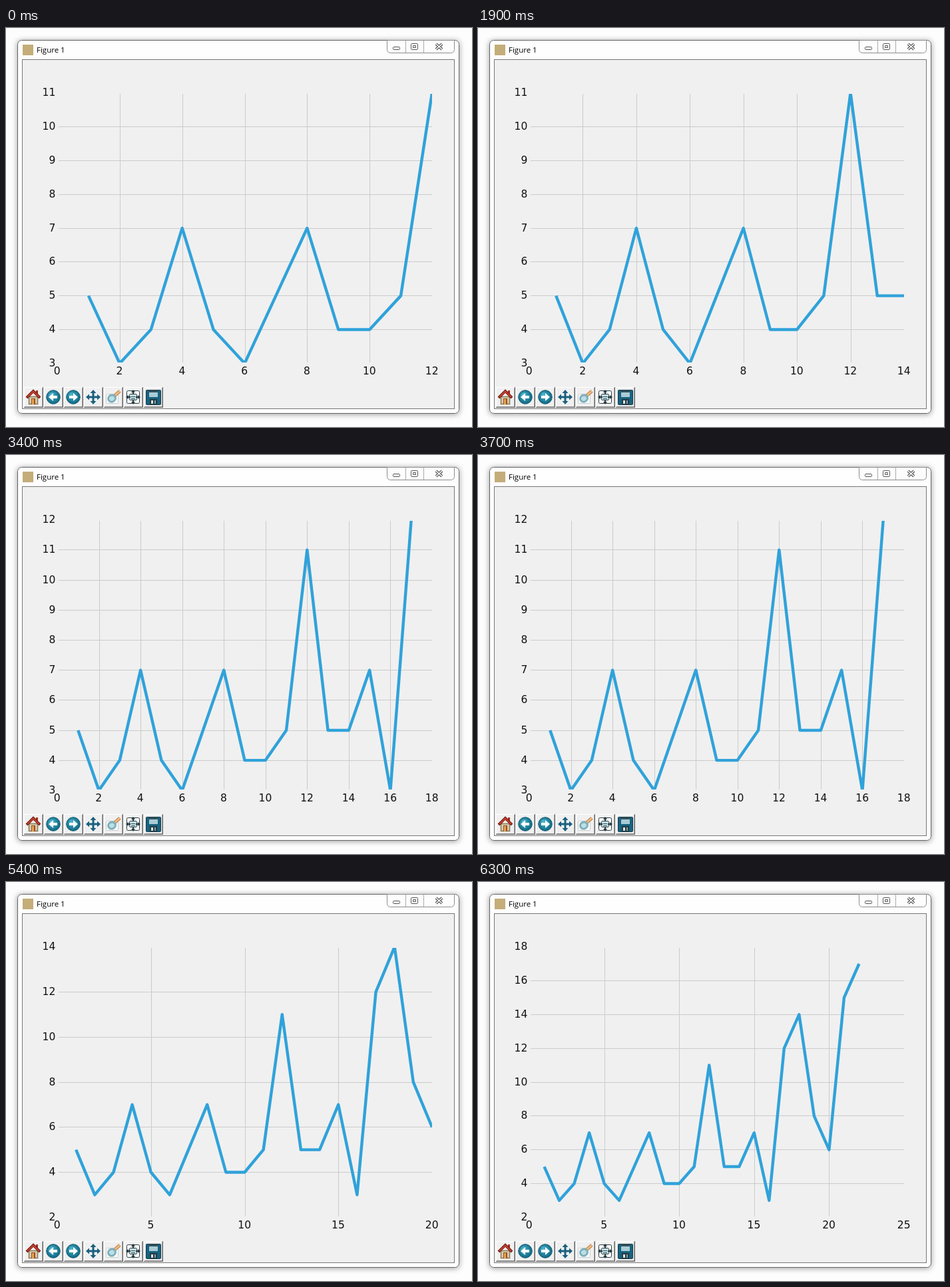
Recreate the animation shown at these times as an HTML page with a canvas. Size 700 px wide and 600 px high, loop 6.9 s.

```html
<!DOCTYPE html>
<html lang="en">
<head>
<meta charset="utf-8">
<title>Figure 1</title>
<style>
html, body { margin: 0; width: 100%; height: 100%; overflow: hidden; background: #fdfdfd; }
canvas { display: block; }
</style>
</head>
<body>
<canvas id="stage" width="700" height="600"></canvas>
<script>
const ctx = document.getElementById('stage').getContext('2d');
const LOOP = 6900;
const values = [5, 3, 4, 7, 4, 3, 5, 7, 4, 4, 5, 11, 5, 5, 7, 3, 12, 14, 8, 6, 15, 17];
const arrivals = [1200, 1700, 2200, 2700, 3300, 4000, 4400, 4900, 5500, 6000];
const firstCount = values.length - arrivals.length;
const plot = { left: 77, right: 640, top: 97.3, bottom: 504 };

function rect(x, y, w, h, color) {
  ctx.fillStyle = color;
  ctx.fillRect(x, y, w, h);
}

function path(points, { fill, stroke, width = 1, close = false } = {}) {
  ctx.beginPath();
  points.forEach(([x, y]) => ctx.lineTo(x, y));
  if (close) ctx.closePath();
  if (fill) { ctx.fillStyle = fill; ctx.fill(); }
  if (stroke) { ctx.strokeStyle = stroke; ctx.lineWidth = width; ctx.stroke(); }
}

function box(x, y, w, h, radii, fill, stroke) {
  ctx.beginPath();
  ctx.roundRect(x, y, w, h, radii);
  if (fill) { ctx.fillStyle = fill; ctx.fill(); }
  if (stroke) { ctx.strokeStyle = stroke; ctx.lineWidth = 1; ctx.stroke(); }
}

function text(str, x, y, align, font, color = '#111') {
  ctx.font = font;
  ctx.textAlign = align;
  ctx.fillStyle = color;
  ctx.fillText(str, x, y);
}

function drawWindow() {
  rect(0, 0, 700, 600, '#fdfdfd');
  ctx.save();
  ctx.shadowColor = 'rgba(0,0,0,.4)';
  ctx.shadowBlur = 8;
  ctx.shadowOffsetY = 1;
  box(17, 18, 664, 562, 6, '#fff');
  ctx.restore();
  box(17.5, 18.5, 663, 561, 6, '#fefefe', '#666');
  rect(24, 47, 650, 526, '#777');
  rect(25, 48, 648, 524, '#f0f0f0');
  rect(25, 25, 16, 16, '#c4ad78');
  text('Figure 1', 46, 37, 'left', '11.5px "Open Sans", "Noto Sans", sans-serif', '#000');
  drawCaptionButtons();
}

function drawCaptionButtons() {
  box(572.5, 18.5, 101, 19, [0, 0, 5, 5], '#fdfdfd', '#8c8c8c');
  rect(600, 19, 1, 18, '#aaa');
  rect(627, 19, 1, 18, '#aaa');
  box(581.5, 28.5, 10, 4, 1, '#fff', '#555');
  box(608.5, 23.5, 10, 9, 1, '#fff', '#555');
  box(611.5, 26.5, 4, 3, 0, '#fff', '#555');
  for (const [color, width] of [['#555', 4], ['#fff', 1.6]]) {
    path([[646, 24], [655, 32]], { stroke: color, width });
    path([[655, 24], [646, 32]], { stroke: color, width });
  }
}

function homeIcon() {
  rect(-7, -1, 14, 12, '#d8cfae');
  ctx.strokeStyle = '#8a7d5c';
  ctx.strokeRect(-6.5, -.5, 13, 11);
  rect(4, -10, 3, 6, '#a33326');
  path([[-10, 1], [0, -9], [10, 1]], { stroke: '#6e1d18', width: 4 });
  path([[-9, 0], [0, -8.5], [9, 0]], { stroke: '#c9402c', width: 2 });
  rect(-3, 2, 6, 9, '#9c4a2a');
  rect(-2, 3, 3, 8, '#e7a34d');
}

function arrowIcon(dir) {
  const shade = ctx.createRadialGradient(-3, -4, 1, 0, 0, 11);
  shade.addColorStop(0, '#4fb4cb');
  shade.addColorStop(1, '#08657f');
  ctx.beginPath();
  ctx.arc(0, 0, 10.3, 0, Math.PI * 2);
  ctx.fillStyle = shade;
  ctx.fill();
  ctx.strokeStyle = '#1d5f77';
  ctx.lineWidth = 1;
  ctx.stroke();
  const shape = [[7, 0], [0, -6], [0, -2], [-6, -2], [-6, 2], [0, 2], [0, 6]];
  path(shape.map(([x, y]) => [x * dir, y]), { fill: '#fff', close: true });
}

function moveIcon() {
  for (let i = 0; i < 4; i++) {
    path([[0, -11], [4.5, -6], [1.5, -6], [1.5, 0], [-1.5, 0], [-1.5, -6], [-4.5, -6]],
      { fill: '#1a607f', close: true });
    ctx.rotate(Math.PI / 2);
  }
}

function zoomIcon() {
  box(-10.5, -4.5, 18, 14, 1, '#f8fafa', '#c9d0d2');
  path([[1, -1], [10, -9]], { stroke: '#b97842', width: 5 });
  path([[1, -1], [10, -9]], { stroke: '#efbd82', width: 3 });
  ctx.beginPath();
  ctx.ellipse(-2, 2, 5.5, 5, -.4, 0, Math.PI * 2);
  ctx.fillStyle = '#b9dfe7';
  ctx.fill();
  ctx.strokeStyle = '#80aeb9';
  ctx.stroke();
}

function subplotsIcon() {
  box(-9.5, -9.5, 19, 19, 2, '#fff', '#263a40');
  box(-5.5, -4.5, 11, 9, 1, '#c4dce0', '#263a40');
  for (let i = 0; i < 4; i++) {
    path([[-3, -7], [0, -11], [3, -7]], { fill: '#263a40', close: true });
    rect(-1, -7, 2, 3, '#263a40');
    ctx.rotate(Math.PI / 2);
  }
  rect(-3, -1, 6, 1, '#365c66');
  rect(-3, 2, 6, 1, '#365c66');
}

function saveIcon() {
  box(-10.5, -10.5, 22, 22, 1, '#17637f', '#173c4b');
  rect(-6, -10, 13, 10, '#a9cbd6');
  rect(-6, -10, 13, 3, '#34505b');
  rect(-5, 3, 11, 8, '#263b43');
  rect(-3, 5, 3, 5, '#d8e3e6');
  rect(2, 5, 2, 5, '#8aa1a8');
}

const icons = [homeIcon, () => arrowIcon(-1), () => arrowIcon(1), moveIcon, zoomIcon, subplotsIcon, saveIcon];

function drawToolbar() {
  icons.forEach((icon, i) => {
    const x = 27 + i * 30;
    rect(x, 540, 29, 31, '#696969');
    rect(x, 540, 28, 30, '#fff');
    rect(x + 1, 541, 27, 29, '#a0a0a0');
    rect(x + 1, 541, 26, 28, '#f0f0f0');
    ctx.save();
    ctx.translate(x + 14, 555);
    icon();
    ctx.restore();
  });
}

// Smallest tick step that covers the range in at most nine intervals.
function makeAxis(min, max, start, end) {
  const step = [1, 2, 5].find(s => Math.floor(min / s) * s + 9 * s >= max);
  const lo = Math.floor(min / step) * step;
  const hi = Math.ceil(max / step) * step;
  const ticks = [];
  for (let v = lo; v <= hi; v += step) ticks.push(v);
  return { lo, hi, ticks, at: v => start + (v - lo) / (hi - lo) * (end - start) };
}

function drawChart(count) {
  const data = values.slice(0, count);
  const xAxis = makeAxis(1, count, plot.left, plot.right);
  const yAxis = makeAxis(Math.min(...data), Math.max(...data), plot.bottom, plot.top);
  const font = '15.55px "DejaVu Sans", sans-serif';
  const inner = axis => axis.ticks.slice(1, -1);

  inner(xAxis).forEach(v => rect(Math.round(xAxis.at(v)), 99, 1, 404, '#cbcbcb'));
  inner(yAxis).forEach(v => rect(79, Math.round(yAxis.at(v)), 561, 1, '#cbcbcb'));
  xAxis.ticks.forEach(v => text(v, xAxis.at(v) - .3, 520.5, 'center', font));
  yAxis.ticks.forEach(v => text(v, 74.3, Math.round(yAxis.at(v) + 5), 'right', font));

  ctx.save();
  ctx.beginPath();
  ctx.rect(78, 99, 562, 404);
  ctx.clip();
  ctx.lineJoin = 'round';
  path(data.map((v, i) => [xAxis.at(i + 1), yAxis.at(v) + .3]), { stroke: '#30a2da', width: 4.44 });
  ctx.restore();
}

function frame() {
  const time = performance.now() % LOOP;
  drawWindow();
  drawToolbar();
  drawChart(firstCount + arrivals.filter(t => t <= time).length);
  requestAnimationFrame(frame);
}
frame();
</script>
</body>
</html>
```
